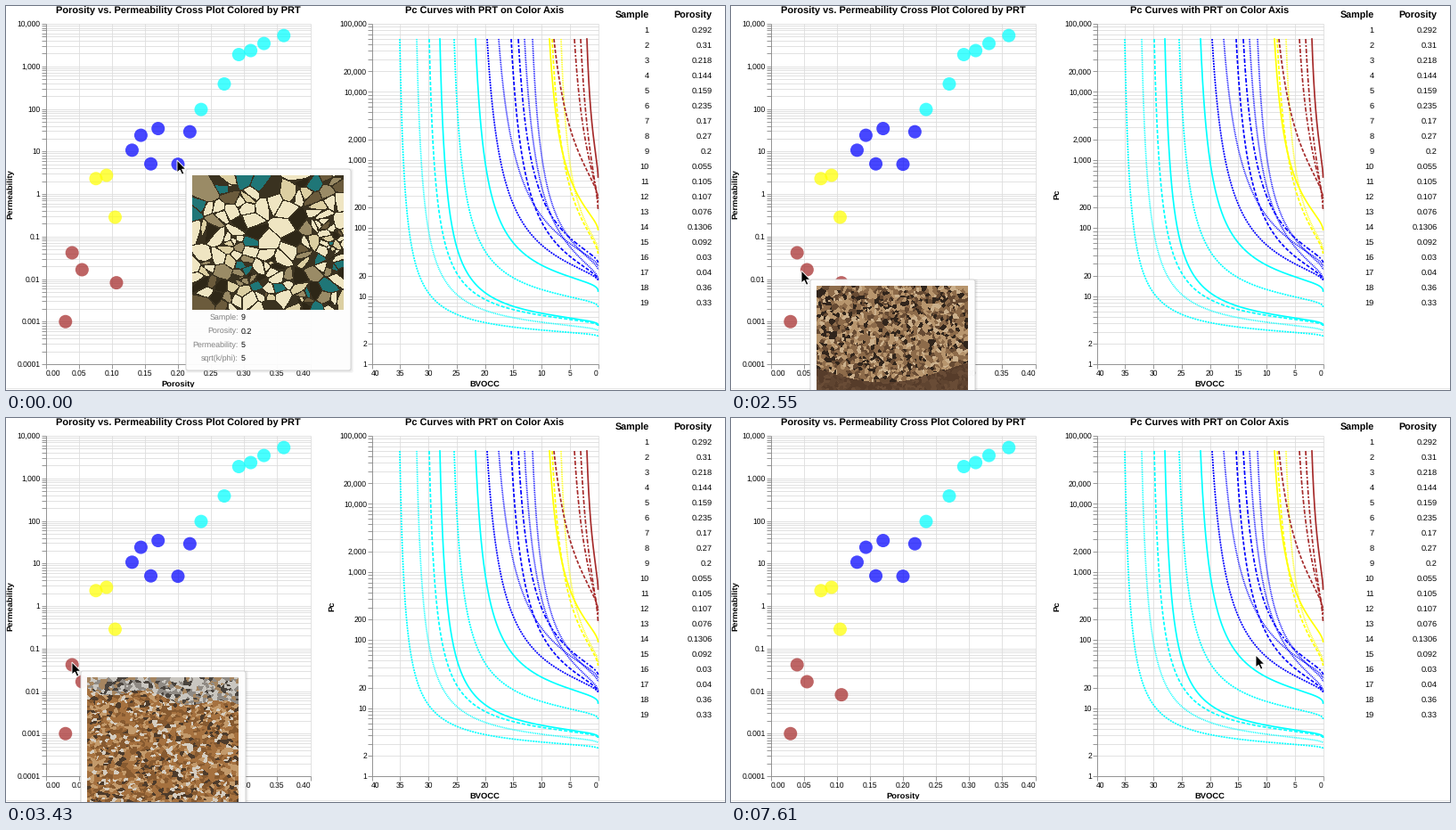
These frames come from a looping animation (807 px wide and 431 px high, 8000 ms). A matplotlib script:

```python
import numpy as np
import matplotlib.pyplot as plt
from matplotlib.animation import FuncAnimation
from matplotlib.collections import LineCollection
from matplotlib.colors import to_rgb
from matplotlib.patches import FancyBboxPatch, Polygon, Rectangle

W, H, DPI = 807, 431, 64  # a power of two keeps the pixel size exact
PX = 72 / DPI  # points per pixel
LOOP, STEP = 8000, 50
TOP, BOTTOM = 20, 402
CYAN, BLUE, YELLOW, BROWN = "cyan", "blue", "yellow", "brown"

plt.rcParams.update({"font.family": "Liberation Sans", "text.hinting": "none"})
fig = plt.figure(figsize=(W / DPI, H / DPI), dpi=DPI, facecolor="white")
ax = fig.add_axes([0, 0, 1, 1])
ax.set(xlim=(0, W), ylim=(H, 0))
ax.axis("off")


def label(x, y, s, size=8.5, ha="center", **kw):
    """Text whose capitals are centred on y; size in pixels."""
    return ax.text(x, y + 0.36 * size, s, fontsize=size * PX, ha=ha, va="baseline", **kw)


def segments(lines, color, z, width=0.85):
    ax.add_collection(LineCollection(lines, colors=color, linewidths=width * PX, zorder=z),
                      autolim=False)


def frame(left, right, xs, ys):
    """Grid, ticks and axis lines of one chart."""
    segments([[(x, TOP), (x, BOTTOM)] for x in xs] + [[(left, y), (right, y)] for y in ys],
             "#dddddd", 1)
    segments([[(x, BOTTOM), (x, BOTTOM + 4.5)] for x in xs]
             + [[(left - 4.5, y), (left, y)] for y in ys]
             + [[(left, TOP), (left, BOTTOM)], [(left, BOTTOM), (right, BOTTOM)]],
             "#888888", 2)


def log_ticks(low, high):
    return [m * 10.0**e for e in range(low, high) for m in range(1, 10)] + [10.0**high]


# ---- cross plot -------------------------------------------------------------
POROSITY = [0.292, 0.31, 0.218, 0.144, 0.159, 0.235, 0.17, 0.27, 0.2, 0.055,
            0.105, 0.107, 0.076, 0.1306, 0.092, 0.03, 0.04, 0.36, 0.33]
PERMEABILITY = [1893, 2350, 29, 24, 5.1, 97, 34.5, 386, 5, 0.0166,
                0.285, 0.0082, 2.3, 10.7, 2.75, 0.001, 0.0415, 5300, 3450]


def por_x(v):
    return 44.5 + np.asarray(v) * 742.5


def perm_y(v):
    return TOP + (4 - np.log10(v)) * (BOTTOM - TOP) / 8


def rock_color(k):
    return BROWN if k < 0.1 else YELLOW if k < 4 else BLUE if k < 60 else CYAN


frame(44.5, 341.5, por_x(np.arange(9) * 0.05), perm_y(log_ticks(-4, 4)))
for i in range(9):
    label({0: 53, 8: 333.5}.get(i, por_x(i * 0.05)), 411.5, f"{i * 0.05:.2f}")
for e in range(-4, 5):
    label(38.5, perm_y(10.0**e), f"{10**e:,}" if e >= 0 else f"{10.0**e:.{-e}f}", ha="right")
label(193, 5, "Porosity vs. Permeability Cross Plot Colored by PRT", 11.05, weight="bold")
label(193, 424, "Porosity", 9.35, weight="bold")
ax.text(5, 211, "Permeability", fontsize=9.35 * PX, weight="bold", rotation=90,
        ha="center", va="center")

dots_x, dots_y = por_x(POROSITY), perm_y(PERMEABILITY)
ax.scatter(dots_x, dots_y, s=(15 * PX) ** 2, c=[rock_color(k) for k in PERMEABILITY],
           alpha=0.72, linewidths=0, zorder=4)

# ---- Pc curves --------------------------------------------------------------
LEFT, RIGHT = 410.5, 664.5


def pc_y(v):
    return TOP + (5 - np.log10(v)) * (BOTTOM - TOP) / 5


def bv_x(v):
    return RIGHT - np.asarray(v) * (RIGHT - LEFT) / 40


frame(LEFT, RIGHT, bv_x(np.arange(0, 41, 5)), pc_y(log_ticks(0, 5)))
for v in range(0, 41, 5):
    label({40: 415, 0: 662.5}.get(v, bv_x(v)), 411.5, str(v))
for e in range(6):
    label(405, pc_y(10**e), f"{10**e:,}", ha="right")
    if e < 5:
        label(405, pc_y(2 * 10**e), f"{2 * 10**e:,}", ha="right")
label(537, 5, "Pc Curves with PRT on Color Axis", 11.05, weight="bold")
label(537, 424, "BVOCC", 9.35, weight="bold")
ax.text(366, 211, "Pc", fontsize=9.35 * PX, weight="bold", rotation=90, ha="center", va="center")

SOLID, DOT, FAINT, DASH, DASHDOT = None, (2, 1), (1, 1), (4, 2), (5, 2, 2, 2)
# colour, dash, start x, a point on the bend, end y
CURVES = [
    (CYAN, DOT, 442, 463, 300, 371), (CYAN, FAINT, 461, 494, 310, 365),
    (CYAN, DASH, 475, 506, 300, 359), (CYAN, SOLID, 487, 518, 300, 358),
    (CYAN, DOT, 503, 541, 280, 338), (CYAN, SOLID, 527, 565, 260, 320),
    (BLUE, DOT, 540, 578, 240, 308), (BLUE, FAINT, 553, 597, 230, 292),
    (BLUE, DASH, 567, 600, 240, 307), (BLUE, DASHDOT, 575, 609, 230, 288),
    (BLUE, FAINT, 582, 614, 240, 306), (BLUE, FAINT, 591, 620, 240, 296),
    (YELLOW, SOLID, 610, 632, 190, 251), (YELLOW, DASH, 613, 632, 200, 278),
    (YELLOW, FAINT, 623, 637, 200, 274),
    (BROWN, DASH, 615, 641, 160, 216), (BROWN, DASHDOT, 638, 652, 160, 222),
    (BROWN, DASHDOT, 645, 654, 150, 230), (BROWN, SOLID, 652, 657.5, 130, 192),
]
PC_START = 37


def pc_curve(x0, xm, ym, y_end, tail):
    """Hyperbola from (x0, PC_START) through (xm, ym) that drops to y_end at zero volume."""
    um = (xm - x0) / (RIGHT - x0)
    vm = (y_end - ym) / (y_end - PC_START) / (1 - um) ** tail
    k = um / (1 / vm - 1)
    u = np.concatenate([np.linspace(0, 1, 160) ** 2.5, 1 - np.linspace(0.1, 0, 40) ** 2])
    u.sort()
    v = (1 - u) ** tail / (1 + u / k)
    return x0 + u * (RIGHT - x0), y_end - v * (y_end - PC_START)


for color, dash, x0, xm, ym, y_end in CURVES:
    width = 1.7
    # dash lengths are in pixels; matplotlib scales them by the width in points
    style = "-" if dash is None else (0, [d / width for d in dash])
    ax.plot(*pc_curve(x0, xm, ym, y_end, 0.4 if color == CYAN else 0.6), color=color,
            lw=width * PX, ls=style, dash_capstyle="butt", zorder=3)

# ---- table and page edge ----------------------------------------------------
label(721.5, 9.5, "Sample", 10.8, "right", weight="bold")
label(792.5, 9.5, "Porosity", 10.8, "right", weight="bold")
for i, phi in enumerate(POROSITY):
    label(721.5, 27 + 17 * i, str(i + 1), 9.3, "right")
    label(792.5, 27 + 17 * i, f"{phi:g}", 9.3, "right")
ax.add_patch(Rectangle((0, 428), W, 3, fc="white", zorder=5))
segments([[(0, 428.5), (W, 428.5)]], "#e2e2e2", 6)

# ---- rock thin sections -----------------------------------------------------
IMG_W = 170


def cells(height, count, stretch, seed):
    """Nearest-seed cell number of each pixel and its distance to the cell edge."""
    rng = np.random.default_rng(seed)
    y, x = np.mgrid[:height, :IMG_W].astype("float32")
    best = np.full(x.shape, 1e9, "float32")
    second, ids = best.copy(), np.zeros(x.shape, int)
    for i, (cx, cy) in enumerate(rng.random((count, 2)) * (IMG_W, height)):
        d = (x - cx) ** 2 + ((y - cy) * stretch) ** 2
        second = np.minimum(second, np.maximum(best, d))
        ids[d < best] = i
        best = np.minimum(best, d)
    return ids, np.sqrt(second) - np.sqrt(best)


def paint(ids, colors, weights, seed=1):
    rng = np.random.default_rng(seed)
    p = np.array(weights) / sum(weights)
    palette = np.array([to_rgb(c) for c in colors])
    return palette[rng.choice(len(colors), ids.max() + 1, p=p)][ids]


def sandstone():
    ids, gap = cells(151, 170, 1.1, 4)
    img = paint(ids, ["#efe5c2", "#dccfa2", "#9a8b66", "#2e2717", "#1f7677", "#6b5b3c"],
                [42, 14, 14, 12, 11, 7])
    img[gap < 1.3] = to_rgb("#3a3220")
    return img


def shale():
    ids, _ = cells(120, 1800, 2.6, 5)
    img = paint(ids, ["#6b4521", "#543418", "#7d5730", "#3b2612", "#d6cbb8"],
                [36, 30, 20, 11, 3])
    img[109:119, 150:] = to_rgb("#e6de86")
    return img


def speckled():
    ids, _ = cells(151, 2200, 1, 6)
    img = paint(ids, ["#b7956d", "#8d6b4a", "#31251c", "#664a33", "#cbb08c"], [24, 26, 18, 20, 12])
    base = paint(ids, ["#5f4430", "#563c2a", "#694c36"], [1, 1, 1])
    y, x = np.mgrid[:151, :IMG_W]
    return np.where((y > 92 + 16 * np.sin(np.pi * x / 150))[..., None], base, img)


def rusty():
    ids, _ = cells(151, 2200, 1.3, 7)
    img = paint(ids, ["#a5713f", "#875a30", "#c39a6b", "#d5cdc0", "#4d3b2b"], [32, 24, 20, 13, 11])
    gray = paint(ids, ["#c9c6c0", "#8f8a84", "#a58560", "#4a443e"], [32, 28, 22, 18])
    y, x = np.mgrid[:151, :IMG_W]
    return np.where((y < 12 + 0.12 * x + 5 * np.sin(x / 14))[..., None], gray, img)


SECTIONS = {9: sandstone(), 10: speckled(), 16: shale(), 17: rusty()}

# ---- tooltip ----------------------------------------------------------------
TIP_W, PAD, ROWS_H = 185, 7, 68


def card(z, **kw):
    return ax.add_patch(FancyBboxPatch((0, 0), 1, 1, boxstyle="round,pad=0,rounding_size=2.5",
                                       zorder=z, **kw))


shadows = [card(10, fc=(0, 0, 0, 0.035), ec="none") for _ in range(3)]
panel = card(11, fc=(1, 1, 1, 0.96), ec="#d0d0d0", lw=0.85 * PX)
photo = ax.imshow(SECTIONS[9], aspect="auto", interpolation="nearest", zorder=12)
ax.set(xlim=(0, W), ylim=(H, 0))
keys = [label(0, 0, s + ":", 8.9, "right", color="#808080", zorder=12)
        for s in ("Sample", "Porosity", "Permeability", "sqrt(k/phi)")]
values = [label(0, 0, "", 8.9, "left", zorder=12) for _ in keys]
scale_note = label(0, 0, "500 µm", 5.4, zorder=13)
tooltip = [*shadows, panel, photo, *keys, *values]


def show_tooltip(sample, x, y):
    img = SECTIONS[sample]
    img_h = img.shape[0]
    height = PAD + img_h + ROWS_H
    left = x + 10
    top = y - 10 - height if sample == 16 else y + 10
    for grow, shadow in enumerate(shadows):
        shadow.set_bounds(left + 1 - grow, top + 1 - grow, TIP_W + 2 * grow, height + 2 * grow)
    panel.set_bounds(left, top, TIP_W, height)
    ix, iy = left + PAD, top + PAD
    photo.set_data(img)
    photo.set_extent((ix, ix + IMG_W, iy + img_h, iy))
    phi, k = POROSITY[sample - 1], PERMEABILITY[sample - 1]
    facts = (sample, phi, k, round((k / phi) ** 0.5, 2))
    for row, (key, value, fact) in enumerate(zip(keys, values, facts)):
        base = iy + img_h + 8 + 15.4 * row + 3.2
        key.set_position((ix + 52, base))
        value.set_position((ix + 55, base))
        value.set_text(f"{fact:g}")
    scale_note.set_position((ix + 160, iy + 116))


# ---- pointer ----------------------------------------------------------------
ARROW = np.array([(0, 0), (0, 14), (3.2, 11.1), (5.6, 16.2), (7.9, 15.2), (5.6, 10.2), (9.9, 10.2)])
pointer = ax.add_patch(Polygon(ARROW, fc="black", ec="white", lw=0.9 * PX, zorder=20))

# time in ms, pointer position held until the next entry
PATH = np.array([
    (0, 192, 173), (450, 180, 195), (600, 142, 245), (750, 101, 306), (900, 72, 340),
    (1050, 66, 351), (1200, 64, 354), (1650, 66, 341), (1800, 67, 328), (1950, 69, 316),
    (2100, 72, 308), (2250, 76, 303), (2400, 79, 299), (2550, 79, 297), (2700, 83, 293),
    (2850, 81, 287), (2980, 81, 283), (3130, 79, 277), (3280, 77, 276), (3430, 74, 274),
    (4030, 90, 275), (4180, 130, 272), (4330, 190, 269), (4480, 272, 266), (4620, 375, 263),
    (4770, 478, 262), (4920, 550, 262), (5070, 589, 263), (5220, 597, 264), (5510, 594, 266),
    (5660, 588, 269), (5810, 583, 269), (5960, 584, 268), (6110, 587, 266), (6410, 586, 266),
    (6710, 588, 266), (6860, 590, 267), (7460, 590, 268), (7610, 589, 266),
])


def update(i):
    now = i * STEP + STEP - 5
    _, x, y = PATH[np.searchsorted(PATH[:, 0], now, side="right") - 1]
    pointer.set_xy(ARROW + (x, y))
    distance = np.hypot(dots_x - x, dots_y - y)
    sample = int(distance.argmin()) + 1
    hit = bool(distance.min() < 7.5) and sample in SECTIONS
    if hit:
        show_tooltip(sample, x, y)
    for artist in tooltip:
        artist.set_visible(hit)
    scale_note.set_visible(hit and sample == 16)
    return [*tooltip, scale_note, pointer]


anim = FuncAnimation(fig, update, frames=LOOP // STEP, interval=STEP, repeat=True,
                     repeat_delay=0, blit=False)
plt.show()
```
